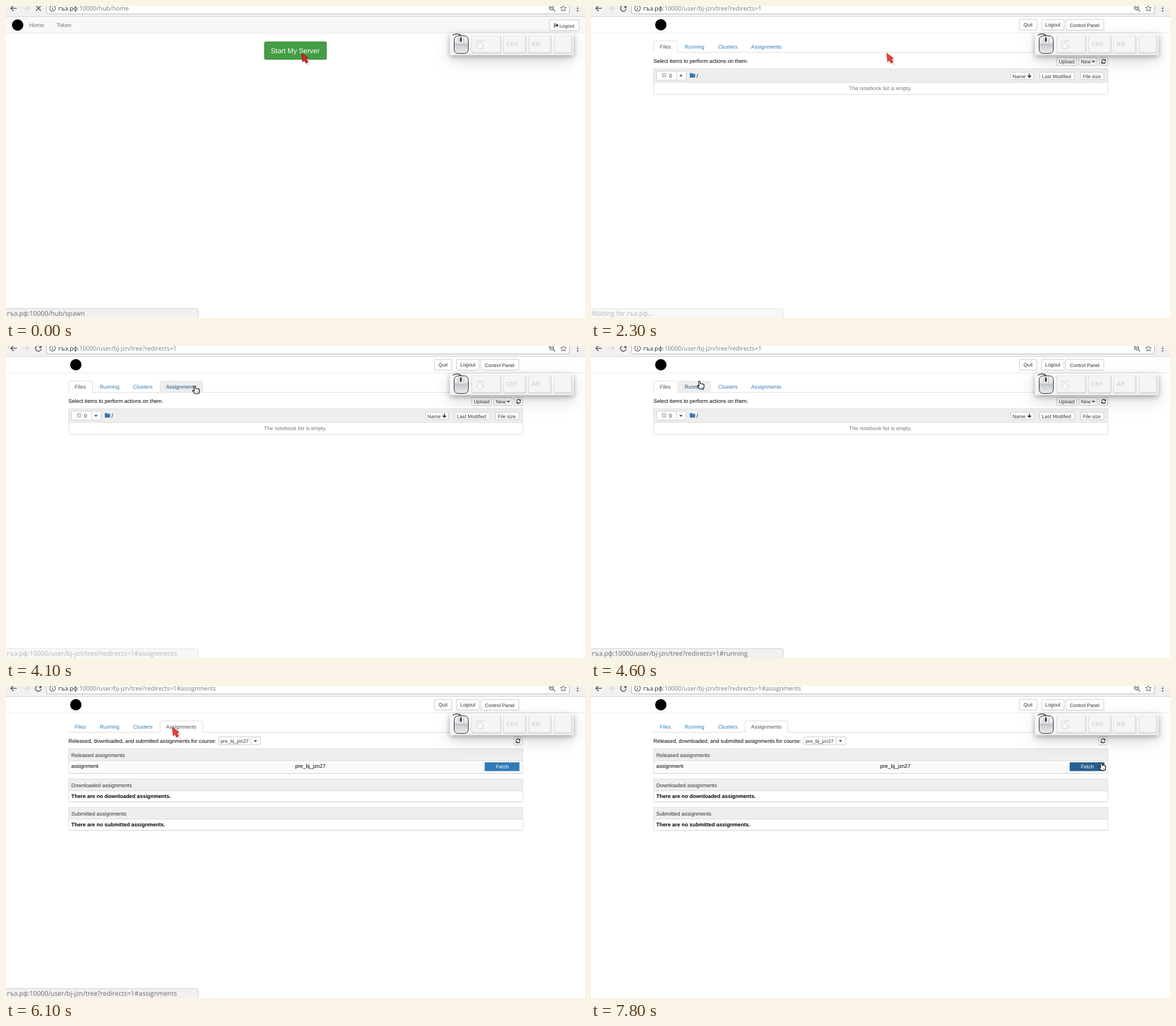
An HTML page that plays this animation: 1020x549 px, repeating every 8 s.

```html
<!DOCTYPE html>
<html lang="en">
<head>
<meta charset="utf-8">
<title>Starting a server</title>
<style>
html, body { margin: 0; width: 100%; height: 100%; overflow: hidden; background: #fff; }
svg { display: block; width: 1020px; height: 549px; }
text { font-family: "Liberation Sans", Arial, sans-serif; text-rendering: geometricPrecision; white-space: pre; }
.ui { font-family: "Open Sans", "Noto Sans", sans-serif; }
.key { font-family: "DejaVu Sans", sans-serif; font-weight: bold; }
#keys { filter: drop-shadow(0 3px 5px rgba(0,0,0,.3)) drop-shadow(0 10px 14px rgba(0,0,0,.13)); }
</style>
</head>
<body>
<svg viewBox="0 0 1020 549" xmlns="http://www.w3.org/2000/svg">
  <defs>
    <linearGradient id="mouseFill" x1="0" x2="0" y1="0" y2="1">
      <stop offset="0" stop-color="#f2f2f3"/><stop offset=".4" stop-color="#e2e3e6"/>
      <stop offset=".5" stop-color="#c6cad0"/><stop offset="1" stop-color="#ececee"/>
    </linearGradient>
    <linearGradient id="boxFill" x1="0" x2="0" y1="0" y2="1">
      <stop offset="0" stop-color="#fafafa"/><stop offset="1" stop-color="#f1f1f1"/>
    </linearGradient>
  </defs>
  <g id="page"></g>
  <g id="chrome"></g>
  <g id="keys"></g>
  <g id="status"></g>
  <g id="cursor"></g>
</svg>
<script>
const LOOP = 8000;
const HOST = "гъэ.рф", PORT = ":10000";
const TREE = "/user/bj-jzn/tree?redirects=1";
const COURSE = "pre_bj_jzn27";
const BLUE = "#337ab7", BODY = 9.33, SMALL = 8.65;

// Each row: start time, then the values that hold until the next row.
const pages = [[0, "hub"], [2300, "files"], [6100, "tasks"]];
const paths = [[0, "/hub/home"], [1900, TREE], [6100, TREE + "#assignments"]];
const hovers = [[0, ""], [3900, "Assignments"], [4600, "Running"], [5200, "Assignments"],
  [6100, ""], [7000, "Fetch"], [7500, ""], [7800, "Fetch"]];
const statuses = [[0, HOST + PORT + "/hub/spawn", 1], [100, `Waiting for ${HOST}…`, 1],
  [2300, `Waiting for ${HOST}…`, .5], [2500, "", 0],
  [4100, HOST + PORT + TREE + "#assignments", .5],
  [4600, HOST + PORT + TREE + "#running", 1],
  [5200, HOST + PORT + TREE + "#assignments", 1],
  [6700, HOST + PORT + TREE + "#assignments", .5], [7000, "", 0]];
const cursors = [[0, "press", 521, 83], [2300, "arrow", 521, 83], [3400, "arrow", 451, 83],
  [3600, "arrow", 387, 74], [3900, "arrow", 328, 70], [4100, "hand", 328, 70],
  [4600, "hand", 186.5, 61.5], [4900, "hand", 190, 64], [5200, "hand", 285.5, 74],
  [5500, "hand", 290.5, 72.5], [6100, "arrow", 293, 72.5], [6400, "arrow", 653, 131],
  [6700, "arrow", 748, 132], [7000, "hand", 884, 136], [7500, "arrow", 868, 159],
  [7800, "hand", 894, 134.5]];

const at = (rows, t) => rows.findLast(row => row[0] <= t).slice(1);
const text = (x, y, s, size = BODY, fill = "#000", extra = "") =>
  `<text x="${x}" y="${y}" font-size="${size}" fill="${fill}" ${extra}>${s}</text>`;
const rect = (x, y, w, h, fill, stroke = "none", r = 0) =>
  `<rect x="${x}" y="${y}" width="${w}" height="${h}" rx="${r}" fill="${fill}" stroke="${stroke}"/>`;
const path = (d, fill, stroke = "none", width = 1) =>
  `<path d="${d}" fill="${fill}" stroke="${stroke}" stroke-width="${width}" stroke-linejoin="round"/>`;
const button = (x, y, w, h, label, dx, dy, size = SMALL) =>
  rect(x + .5, y + .5, w - 1, h - 1, "#fff", "#ccc", 1.3) + text(x + dx, y + dy, label, size, "#333");
const caret = (x, y) => path(`M${x} ${y}h6l-3 3z`, "#333");
const badge = (x, y) => `<circle cx="${x}" cy="${y}" r="10" fill="#000"/>`;

function refresh(x, y) {
  return button(x, y, 16, 15, "", 0, 0) + `<g transform="translate(${x + 8} ${y + 7.5})">` +
    path("M-3.4 -.8A3.5 3.5 0 0 1 2.8 -2.2M3.4 .8A3.5 3.5 0 0 1 -2.8 2.2", "none", "#222", 1.3) +
    path("M4 -4v3.3h-3.3zM-4 4v-3.3h3.3z", "#222") + "</g>";
}

function hub() {
  return rect(0, 19, 1020, 29, "#f8f8f8") + rect(0, 47.5, 1020, 1, "#e7e7e7") + badge(20.5, 33.5) +
    text(40.5, 37, "Home", 10, "#777") + text(89, 37, "Token", 9.8, "#777") +
    button(957, 24, 53, 20, "Logout", 18, 13.5, 8.5) +
    path("M968.5 31H966v6h2.5", "none", "#333", 1.2) +
    path("M967.5 33h2.5v-2.2l3.5 3.2l-3.5 3.2V35h-2.5z", "#333") +
    rect(455.5, 63, 109, 31, "#449d44", "#398439", 2) +
    text(466.5, 82.5, "Start My Server", 12.4, "#fff");
}

function tabs(active, hover) {
  const items = [["Files", 110, 43], ["Running", 154, 57], ["Clusters", 213, 56], ["Assignments", 271, 76]];
  return rect(110, 81, 801, 1, "#ddd") + items.map(([name, x, w]) => {
    const on = name === active, over = name === hover;
    const shape = `M${x + .5} 82V64q0-2.5 2.5-2.5H${x + w - 3}q2.5 0 2.5 2.5V82`;
    const back = on ? path(shape, "#fff", "#ddd") : over ? path(shape.replaceAll("82", "81"), "#eee", "#e6e6e8") : "";
    return back + text(x + 11, 75, name, BODY, on ? "#555" : over ? "#23527c" : BLUE);
  }).join("");
}

function header() {
  return rect(0, 47, 1020, 1, "#e7e7e7") + badge(123, 33) +
    button(754, 23, 32, 20, "Quit", 8, 13) + button(793, 23, 41, 20, "Logout", 7, 13, 8.8) +
    button(836, 23, 68, 20, "Control Panel", 7.5, 14);
}

function files(hover) {
  return header() + tabs("Files", hover) +
    text(110, 100, "Select items to perform actions on them.") +
    button(820, 90, 36, 15, "Upload", 4, 11, 8.8) +
    button(859, 90, 33, 15, "New", 4, 11) + caret(882, 96.5) + refresh(895, 90) +
    rect(110.5, 110.5, 800, 45, "#fff", "#ddd", 1) + rect(110.5, 110.5, 800, 24, "#eee", "#ddd") +
    button(115, 114, 36, 17, "0", 22.5, 12, BODY) + rect(125.5, 118.5, 6.5, 6.5, "#ddd", "#aaa", 1) +
    button(150, 114, 18, 17, "", 0, 0) + caret(155.5, 121.5) +
    path("M174 119q0-1 1-1h2.5q1 0 1 1.2h4q1 0 1 1v4.8q0 1-1 1h-7.5q-1 0-1-1z", BLUE) +
    text(186, 126, "/", BODY, "#000") +
    button(739, 116, 41, 14, "Name", 3.5, 11) +
    path("M772.3 119v6M769.3 122.5l3 3l3-3", "none", "#222", 1.6) +
    button(790, 116, 62, 14, "Last Modified", 4.5, 11) +
    button(862, 116, 42, 14, "File size", 4.5, 11) +
    text(454.5, 148, "The notebook list is empty.", BODY, "#777");
}

function panel(y, h, title, body, bold) {
  return rect(110, y + h, 801, 1, "#ebebeb") + rect(110.5, y + .5, 800, h - 1, bold ? "#fff" : "#fbfbfb", "#ddd", 1) +
    rect(110.5, y + .5, 800, 21, "#eee", "#ddd") + text(115, y + 15, title, BODY, "#333") +
    text(115, y + 34, body, BODY, "#000", bold ? 'font-weight="bold"' : "");
}

function tasks(hover) {
  return header() + tabs("Assignments", hover) +
    text(110, 100, "Released, downloaded, and submitted assignments for course:") +
    button(374, 89, 58, 15, COURSE, 4, 11, 8.6) + button(431, 89, 18, 15, "", 0, 0) + caret(436.5, 95.5) +
    refresh(894, 89) +
    panel(110, 44, "Released assignments", "assignment", false) + text(509.5, 144, COURSE) +
    rect(843.3, 134.3, 61.2, 15.4, hover === "Fetch" ? "#286090" : BLUE) +
    text(863, 145, "Fetch", 9.1, "#fff") +
    panel(163, 41, "Downloaded assignments", "There are no downloaded assignments.", true) +
    panel(213, 41, "Submitted assignments", "There are no submitted assignments.", true);
}

function chrome(route, loading) {
  const line = "#5a5a5a";
  const load = loading ? path("M53-.5l8.5 9M61.5-.5l-8.5 9", "none", line, 1.6)
    : path("M61.2 1.5A5 5 0 1 0 62 5", "none", line, 1.6) + path("M62.5-1.5V3.5H57.5z", line);
  const star = Array.from({ length: 10 }, (_, i) => {
    const a = i * Math.PI / 5, r = i % 2 ? 2.5 : 5.4;
    return `${982 + r * Math.sin(a)},${4.5 - r * Math.cos(a)}`;
  }).join(" ");
  return rect(0, 0, 1020, 18, "#f2f1f0") + rect(0, 18, 1020, 1, "#d3d2d0") +
    rect(71.5, -10, 921, 24, "#fff", "#b5b2ae", 3) +
    path("M19 4H8.5M13.5-1l-5 5l5 5", "none", line, 1.6) +
    path("M30 4h10.5M35.5-1l5 5l-5 5", "none", "#d5d4d3", 1.6) + load +
    `<circle cx="82" cy="4" r="5" fill="none" stroke="${line}" stroke-width="1.2"/>` +
    rect(81.4, 3.2, 1.3, 3.8, line) + rect(81.4, 1, 1.3, 1.3, line) +
    text(92, 8, `<tspan fill="#222">${HOST}</tspan>${PORT}${route}`, 10.7, "#777", 'class="ui"') +
    `<circle cx="961" cy="3" r="3.6" fill="none" stroke="${line}" stroke-width="1.3"/>` +
    path("M959 3h4M963.7 5.7l3.6 3.8", "none", line, 1.4) +
    `<polygon points="${star}" fill="none" stroke="${line}"/>` +
    [-.5, 4, 8.5].map(y => `<circle cx="1007" cy="${y}" r="1.3" fill="${line}"/>`).join("");
}

function keys() {
  const cap = (x, w) => rect(x + .5, 52.5, w, 31, "#dfdfdf", "#dadada", 2) + rect(x + 1, 52.5, w - 2.5, 28.5, "#f5f5f5", "none", 2);
  return rect(782, 48, 218, 38.5, "url(#boxFill)") +
    cap(820, 52) + cap(876, 40) + cap(920, 40) + cap(965, 32) +
    text(827.5, 64, "SHIFT", 4.8, "#d8d8d8", 'class="key"') +
    path("M827 71l8-5.5l8 5.5h-4v4h-8v-4z", "#fafafa", "#d6d6d6") +
    text(881.5, 70, "Ctrl", 9.9, "#d8d8d8", 'class="key"') +
    text(925.5, 70, "Alt", 9.9, "#d8d8d8", 'class="key"') +
    path("M787 51.5q5-3.5 10-2q4 .5 4.5 4", "none", "#111", 1.3) +
    rect(789.5, 52.5, 25, 31, "url(#mouseFill)", "#222", 7) +
    path("M790.5 66q11.5 4 23 0M797 53v13M806.5 53v13", "none", "#b4b7bc", .8) +
    rect(799.8, 55, 3, 8, "#333", "none", 1.5);
}

function status(label, alpha) {
  if (!alpha) return "";
  return `<g opacity="${alpha}">` + path("M-1 532.5H335.5q3 0 3 3V550H-1z", "#f2f1f0", "#cfcdcb") +
    text(1.5, 545, label, 11.52, "#6a6a6a", 'class="ui"') + "</g>";
}

function cursor(kind, x, y) {
  const arrow = "M0 0L12 9L8 10.2L11 15.6L7.6 17.8L4.6 12.6L1.6 15.4Z";
  const hand = "M3 1.3Q4.4-.3 5.6 1.3L6.2 5L9.4 5.2Q12.6 5.3 12.8 7.6L12.5 11.2L11.6 14H5.2L1 9.4Q.2 7.7 2 7.8L4 9.2Z";
  const art = kind === "hand"
    ? path(hand, "#fff", "#111", 1.2) + path("M8 10v2.5M10 10v2.5", "none", "#555", .7)
    : `<g transform="translate(4 4.2)" opacity=".75">${path(arrow, "#ded9d9")}</g>` +
      path(arrow, kind === "press" ? "#d9251f" : "#f23a35", kind === "press" ? "#5b1714" : "#8a2d2a", .8);
  return `<g transform="translate(${x} ${y})">${art}</g>`;
}

const views = { hub, files, tasks };
const drawn = {};
function put(id, html) {
  if (drawn[id] === html) return;
  drawn[id] = html;
  document.getElementById(id).innerHTML = html;
}

function render(t) {
  const [page] = at(pages, t), [hover] = at(hovers, t), [route] = at(paths, t);
  put("page", views[page](hover));
  put("chrome", chrome(route, page === "hub"));
  put("status", status(...at(statuses, t)));
  put("cursor", cursor(...at(cursors, t)));
}

put("keys", keys());
const start = performance.now();
function tick() {
  render((performance.now() - start) % LOOP);
  requestAnimationFrame(tick);
}
tick();
</script>
</body>
</html>
```
